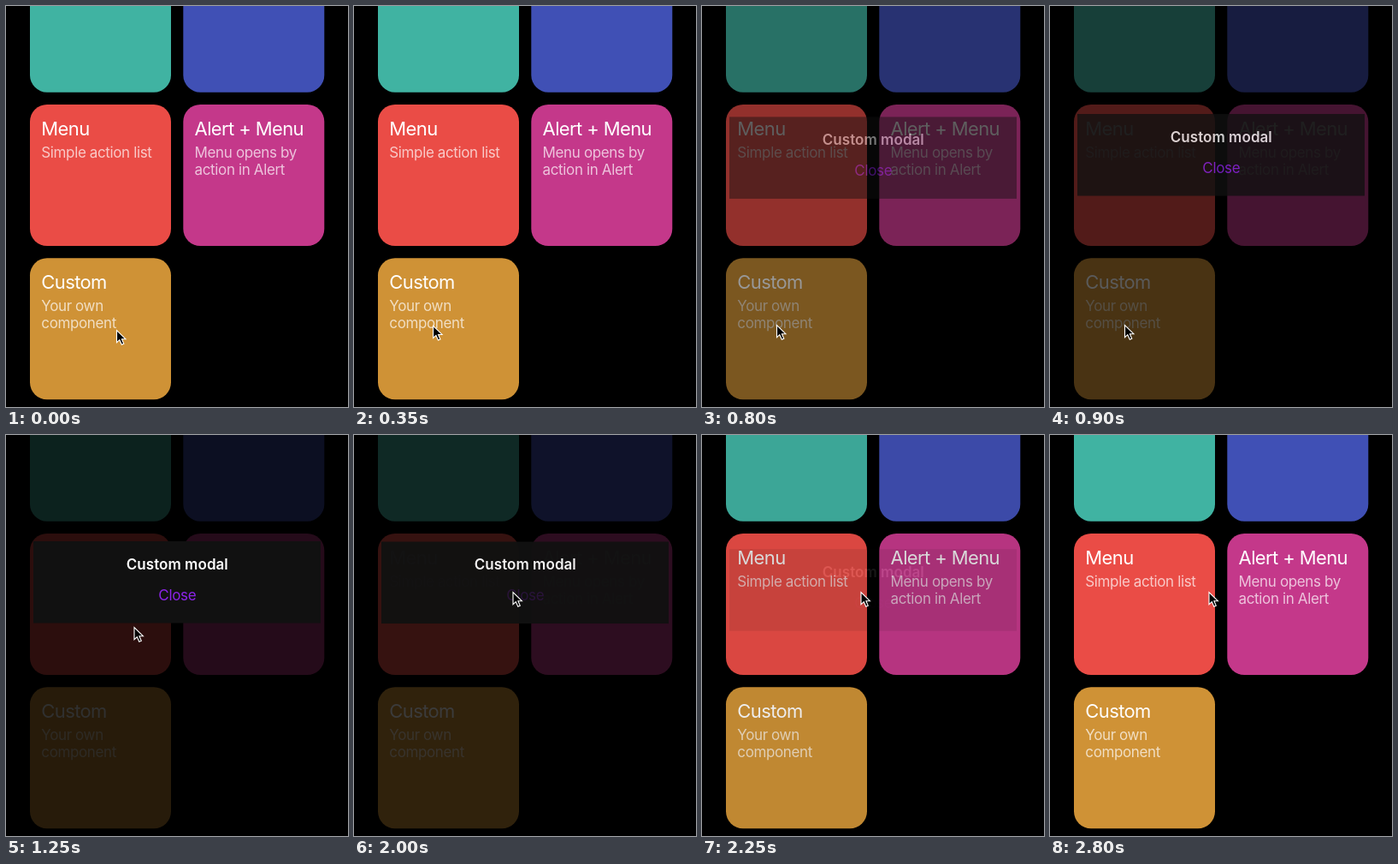
An HTML page for the animation above (2.85 s loop, 400 px wide and 468 px high).

```html
<!DOCTYPE html>
<html lang="en">
<head>
<meta charset="utf-8">
<title>Custom modal</title>
<style>
html, body { margin: 0; width: 100%; height: 100%; overflow: hidden; background: #000; }
svg { display: block; width: 100%; height: 100%; }
text { font-family: Inter, "Open Sans", sans-serif; fill: #fff; }
.title { font-size: 22px; letter-spacing: -.62px; }
.sub { font-size: 17px; letter-spacing: -.37px; fill-opacity: .7; }
.head { font-size: 17px; font-weight: 600; letter-spacing: .05px; text-anchor: middle; }
.close { font-size: 17px; letter-spacing: -.35px; text-anchor: middle; fill: #8c24e8; }
</style>
</head>
<body>
<svg viewBox="0 0 400 468">
  <rect width="400" height="468"/>
  <g id="cards"></g>
  <rect id="shade" width="400" height="468"/>
  <g id="modal">
    <rect x="32" y="124" width="336" height="95.5" fill="#111"/>
    <text class="head" x="200.3" y="156.5">Custom modal</text>
    <text class="close" id="close" x="200.3" y="192.5">Close</text>
  </g>
  <path id="cursor" d="M0 0V14.2L3.3 11.2L5.8 16.8L8.3 15.7L5.9 10.2H10.4Z" stroke="#fff" stroke-width="1.1"/>
</svg>
<script>
const LOOP = 2850;
const $ = id => document.getElementById(id);

const cards = [
  [28, -64.3, '#40b3a2'],
  [207.3, -64.3, '#4050b5'],
  [28, 115, '#ea4c46', 'Menu', 'Simple action list'],
  [207.3, 115, '#c4388a', 'Alert + Menu', 'Menu opens by', 'action in Alert'],
  [28, 294.3, '#cf9236', 'Custom', 'Your own', 'component'],
];

$('cards').innerHTML = cards.map(([x, y, color, title = '', ...lines]) => `
  <g transform="translate(${x} ${y})">
    <rect width="165" height="165" rx="20" fill="${color}"/>
    <text class="title" x="13.3" y="35.7">${title}</text>
    ${lines.map((s, i) => `<text class="sub" x="13.3" y="${61.7 + i * 20.3}">${s}</text>`).join('')}
  </g>`).join('');
const pressed = $('cards').lastElementChild;

const ease = u => u < .5 ? 2 * u * u : 1 - 2 * (1 - u) ** 2;

// Interpolates [time, value] stops with ease-in-out
function track(t, stops) {
  let [t0, v0] = stops[0];
  for (const [t1, v1] of stops) {
    if (t < t1) return t <= t0 ? v0 : v0 + (v1 - v0) * ease((t - t0) / (t1 - t0));
    [t0, v0] = [t1, v1];
  }
  return v0;
}

const open = [[565, 0], [1058, 1], [1937, 1], [2334, 0]];
const cardPress = [[400, 1], [500, .75], [600, .75], [900, 1]];
const closePress = [[1800, 1], [1950, .2]];
const cursorX = [[50, 129.5], [450, 87.5], [950, 87.5], [1250, 150], [1600, 186]];
const cursorY = [[50, 378.5], [450, 372.5], [950, 372.5], [1250, 224.5], [1600, 183.5]];

function draw(t) {
  const p = track(t, open);
  $('shade').setAttribute('opacity', .81 * p);
  $('modal').setAttribute('opacity', p);
  $('modal').setAttribute('transform', `translate(0 ${10 * (1 - p)})`);
  $('close').setAttribute('opacity', track(t, closePress));
  pressed.setAttribute('opacity', track(t, cardPress));
  $('cursor').setAttribute('transform', `translate(${track(t, cursorX)} ${track(t, cursorY)})`);
}

function tick() {
  draw(performance.now() % LOOP);
  requestAnimationFrame(tick);
}
tick();
</script>
</body>
</html>
```
